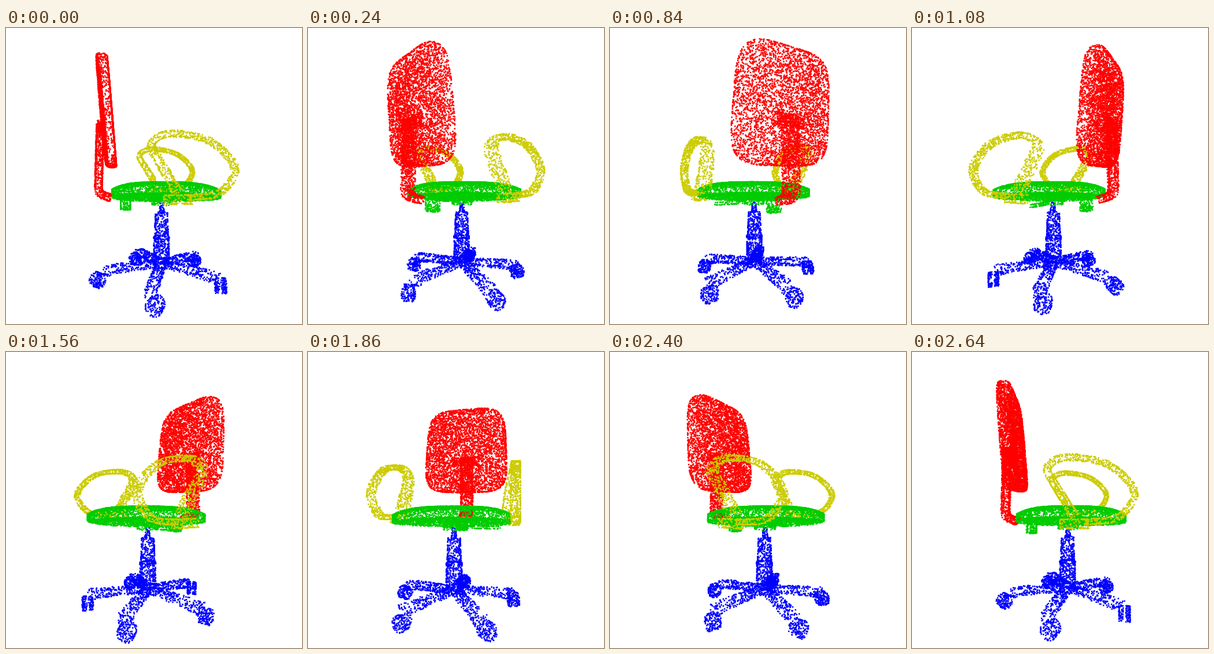
Write an HTML page with a canvas that moves like this. It is 512 px wide and 512 px high and loops after 2.7 s.

```html
<!DOCTYPE html>
<html lang="en">
<head>
<meta charset="utf-8">
<title>Rotating chair point cloud</title>
<style>
html, body { margin: 0; width: 100%; height: 100%; overflow: hidden; background: #fff; }
canvas { display: block; width: 512px; height: 512px; }
</style>
</head>
<body>
<canvas id="stage" width="512" height="512"></canvas>
<script>
const ctx = document.getElementById('stage').getContext('2d');
const RED = '#f00', GREEN = '#0c0', BLUE = '#00f', YELLOW = '#cc0';
const STEP = 60, STEPS = 45, FOCAL = 443, DOT = 2.5;
const TAU = Math.PI * 2, RAD = Math.PI / 180;

let seed = 20177;
function rnd() {
  seed = (seed + 0x6D2B79F5) | 0;
  let t = Math.imul(seed ^ (seed >>> 15), 1 | seed);
  t = (t + Math.imul(t ^ (t >>> 7), 61 | t)) ^ t;
  return ((t ^ (t >>> 14)) >>> 0) / 4294967296;
}
const span = (a, b) => a + (b - a) * rnd();
const sign = () => (rnd() < 0.5 ? -1 : 1);

// Points are [forward, side, up], in pixels around the turning axis at eye level.
const points = [];
function scatter(color, n, make) {
  for (let i = 0; i < n; i++) {
    const [f, s, y] = make();
    points.push({ color, f, s, y, px: 0, py: 0, k: 1 });
  }
}

// Rounded shapes: |x|^e + |y|^e = 1
const norm = (x, y, e) => (Math.abs(x) ** e + Math.abs(y) ** e) ** (1 / e);
function inside(e) {
  let x, y;
  do { x = span(-1, 1); y = span(-1, 1); } while (norm(x, y, e) > 1);
  return [x, y];
}
function edge(e) {
  const a = rnd() * TAU, x = Math.cos(a), y = Math.sin(a), r = norm(x, y, e);
  return [x / r, y / r];
}

// Point on the outline of a rectangle with the given half sizes
function ring(w, h) {
  return rnd() * (w + h) < w ? [span(-w, w), sign() * h] : [sign() * w, span(-h, h)];
}

function spline(p, t) {
  const i = Math.min(Math.floor(t), p.length - 2), u = t - i;
  const a = p[Math.max(i - 1, 0)], b = p[i], c = p[i + 1], d = p[Math.min(i + 2, p.length - 1)];
  return b.map((v, j) => v + 0.5 * u * (c[j] - a[j] +
    u * (2 * a[j] - 5 * v + 4 * c[j] - d[j] + u * (3 * (v - c[j]) + d[j] - a[j]))));
}

// Band swept along [forward, up] points; shape(u) gives [side, half width, half thickness].
function band(color, n, path, shape, place = p => p) {
  const end = path.length - 1;
  scatter(color, n, () => {
    let t, f, y, df, dy, speed;
    do {
      t = rnd() * end;
      [f, y] = spline(path, t);
      const [f2, y2] = spline(path, t + 0.01);
      df = f2 - f;
      dy = y2 - y;
      speed = Math.hypot(df, dy);
    } while (speed < rnd());
    const [s, w, h] = shape(t / end), [a, b] = ring(w, h);
    return place([f - b * dy / speed, s + a, y + b * df / speed]);
  });
}

// Box given by its centre and half sizes
function box(color, n, [f, s, y], [df, ds, dy]) {
  const flat = df * ds, side = df * dy, front = ds * dy;
  scatter(color, n, () => {
    const p = [span(-df, df), span(-ds, ds), span(-dy, dy)];
    const pick = rnd() * (flat + side + front);
    if (pick < flat) p[2] = sign() * dy;
    else if (pick < flat + side) p[1] = sign() * ds;
    else p[0] = sign() * df;
    return [f + p[0], s + p[1], y + p[2]];
  });
}

function tube(color, n, f, y0, y1, r0, r1) {
  scatter(color, n, () => {
    const a = rnd() * TAU, t = rnd(), r = r0 + (r1 - r0) * t;
    return [f + r * Math.cos(a), r * Math.sin(a), y0 + (y1 - y0) * t];
  });
}

function backrest() {
  const at = ([x, v], d, grow = 0) => {
    const y = 100 + (82 + grow) * v;
    return [-71 - 0.081 * y + d, x * (83 + grow - 0.045 * y), y];
  };
  scatter(RED, 3500, () => at(inside(4.6), sign() * 8));
  scatter(RED, 700, () => {
    const a = span(-90, 90) * RAD;
    return at(edge(4.6), 8 * Math.sin(a), 3 * Math.cos(a));
  });
  band(RED, 880, [[-91, 86], [-93.5, -5], [-92, -28], [-73, -37]], () => [0, 12, 5.5]);
  box(RED, 200, [-90, 0, 80], [3.5, 26, 8]);
}

function seat() {
  const at = ([u, v], y) => [18 + 90 * u, 94 * v, y];
  scatter(GREEN, 1600, () => {
    const p = inside(2.5);
    return at(p, -11 - 12 * norm(...p, 2.5) ** 4);
  });
  scatter(GREEN, 1550, () => at(inside(2.5), -35));
  scatter(GREEN, 480, () => at(edge(2.5), span(-35, -23)));
  box(GREEN, 190, [-49, 0, -46], [8, 9, 11]);
  tube(GREEN, 130, 14, -50, -36, 17, 19);
  box(GREEN, 70, [10, -47, -45], [4.5, 29, 2]);
}

function armrest(side) {
  const path = [[20, -22], [-5, 18], [-17, 43], [8, 57], [62, 48], [96, 18], [94, -6], [72, -25], [32, -29]];
  const shape = u => {
    const rear = Math.max(0, 1 - u / 0.45);
    return [102 - 11 * rear, 6 + 6 * rear, 3.5 + 2 * rear];
  };
  band(YELLOW, 840, path, shape, ([f, s, y]) => [f, s * side, y]);
  box(YELLOW, 120, [19, side * 99, -32], [19, 8, 6]);
}

function caster(f, s, turn) {
  const c = Math.cos(turn), n = Math.sin(turn);
  scatter(BLUE, 150, () => {
    const a = rnd() * TAU, rim = rnd() < 0.45;
    const r = 11.5 * (rim ? 1 : Math.sqrt(rnd()));
    const d = sign() * (rim || rnd() < 0.5 ? span(2, 8) : 8);
    const u = r * Math.cos(a) - 7;
    return [f + d * c - u * n, s + d * n + u * c, -172.5 + r * Math.sin(a)];
  });
}

function base() {
  tube(BLUE, 40, 14, -64, -46, 4.5, 3);
  tube(BLUE, 200, 13, -106, -64, 12, 10.5);
  tube(BLUE, 60, 13, -108, -105, 13.5, 13);
  tube(BLUE, 240, 13, -148, -106, 13.5, 13);
  [-21, 7, 45, 0, -10].forEach((swivel, i) => {
    const a = (36 + 72 * i) * RAD, c = Math.cos(a), n = Math.sin(a);
    band(BLUE, 225, [[5, -151], [75, -157], [100, -161]], u => [0, 8, 4 + 4 * u],
      ([r, w, y]) => [13 + r * c - w * n, r * n + w * c, y]);
    caster(13 + 103 * c, 103 * n, a + swivel * RAD);
  });
}

backrest();
seat();
armrest(1);
armrest(-1);
base();

function draw(step) {
  const a = 8 * (step + 1) * RAD, c = Math.cos(a), n = Math.sin(a);
  for (const p of points) {
    p.k = FOCAL / (FOCAL - p.s * c + p.f * n);
    p.px = 256 + (p.f * c + p.s * n) * p.k;
    p.py = 256 - p.y * p.k;
  }
  points.sort((p, q) => p.k - q.k);
  ctx.fillStyle = '#fff';
  ctx.fillRect(0, 0, 512, 512);
  for (const p of points) {
    ctx.fillStyle = p.color;
    ctx.fillRect(p.px - DOT / 2, p.py - DOT / 2, DOT, DOT);
  }
}

let shown = -1;
function tick() {
  const step = Math.floor(performance.now() / STEP) % STEPS;
  if (step !== shown) draw(shown = step);
  requestAnimationFrame(tick);
}
tick();
</script>
</body>
</html>
```
